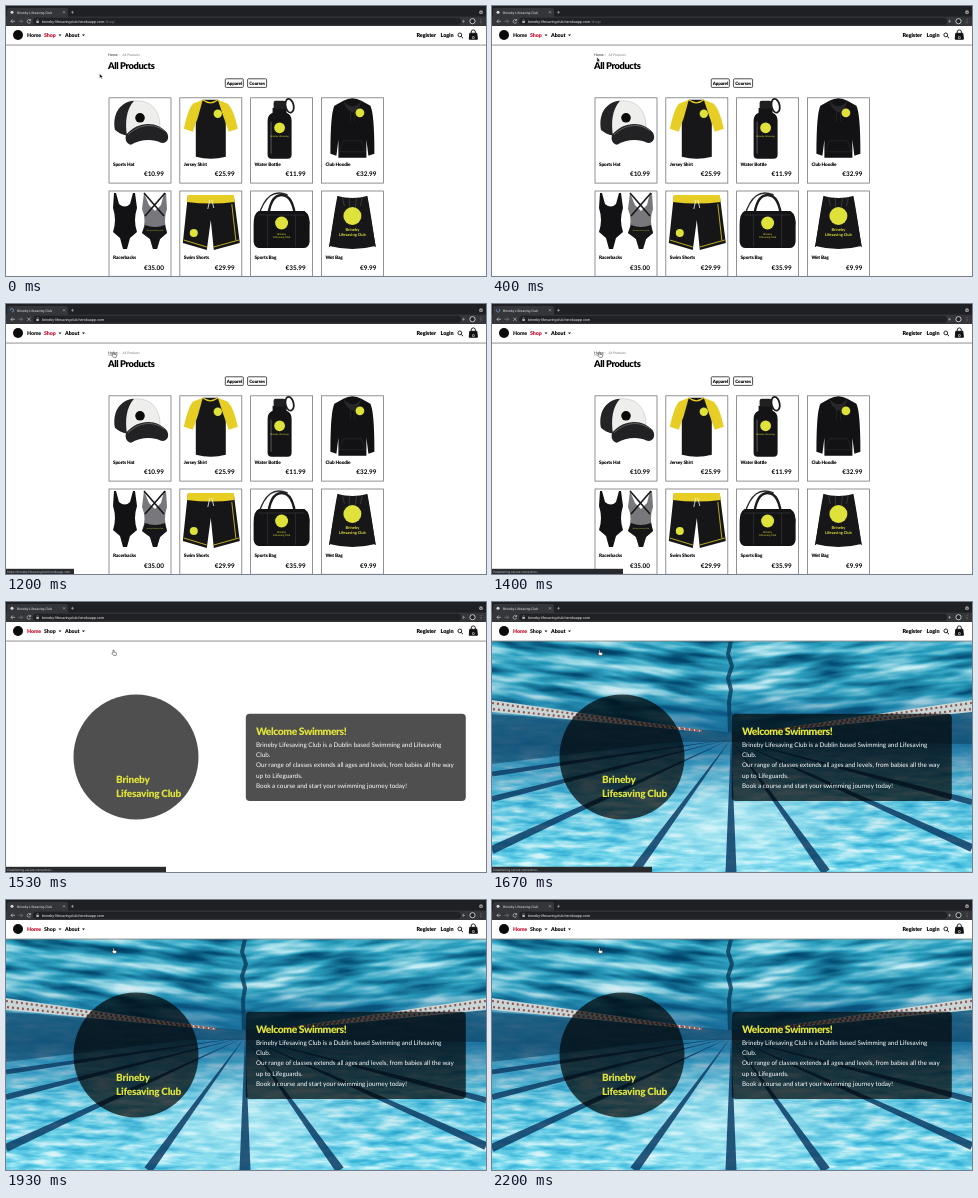
Animation, 480 px wide and 270 px high, one loop 2540 ms. Source, as an HTML page:

```html
<!DOCTYPE html>
<html lang="en">
<head>
<meta charset="utf-8">
<title>Lifesaving club shop</title>
<style>
  html, body { margin: 0; width: 100%; height: 100%; overflow: hidden; background: #fff; }
  svg { display: block; width: 100vw; height: 100vh; }
  text { font-family: Lato, sans-serif; text-rendering: geometricPrecision; white-space: pre; }
  .ui { font-family: Roboto, sans-serif; }
  .head { font-weight: 900; }
</style>
</head>
<body>
<svg id="stage" viewBox="0 0 480 270" xmlns="http://www.w3.org/2000/svg"></svg>
<script>
const LOOP = 2540;
const YELLOW = '#dfe23a', BLACK = '#0b0b0b', RED = '#c8102e';
const HOST = 'brineby-lifesavingclub.herokuapp.com';
const stage = document.getElementById('stage');

const text = (x, y, size, str, attrs = '') =>
  `<text x="${x}" y="${y}" font-size="${size}" ${attrs}>${str}</text>`;
const head = (x, y, size, str, attrs = '') =>
  text(x, y, size, str, `class="head" letter-spacing="${-size * 0.022}" ${attrs}`);
const rect = (x, y, w, h, fill, attrs = '') =>
  `<rect x="${x}" y="${y}" width="${w}" height="${h}" fill="${fill}" ${attrs}/>`;
const path = (d, fill, attrs = '') => `<path d="${d}" fill="${fill}" ${attrs}/>`;
const line = (d, color, width, attrs = '') =>
  path(d, 'none', `stroke="${color}" stroke-width="${width}" ${attrs}`);
const dot = (x, y, r, fill = YELLOW) => `<circle cx="${x}" cy="${y}" r="${r}" fill="${fill}"/>`;

function browser() {
  return rect(0, 0, 480, 20, '#1f2023')
    + path('M1 11V4Q1 2 3 2H60Q62 2 62 4V11Z', '#35363a')
    + rect(0, 10.6, 480, 9.4, '#35363a')
    + rect(27, 11.8, 428, 7, '#202124', 'rx="3.5"')
    + `<g id="favicon">${dot(6, 6.3, 1.5, '#d8d8d8')}</g>`
    + line('M4.3 6.3A1.7 1.7 0 1 1 6 8', '#8ab4f8', 0.6, 'id="spinner"')
    + text(11, 7.6, 3.4, 'Brineby Lifesaving Club', 'class="ui" fill="#e2e2e4"')
    + line('M57 5.3L59 7.3M59 5.3L57 7.3M65 6.3H68M66.5 4.8V7.8', '#c8c9cb', 0.5)
    + dot(475, 6.2, 1.9, '#9a9b9e') + line('M474 5.8L475 6.8L476 5.8', '#1f2023', 0.6)
    + line('M9 15.3H5M6.7 13.5L4.9 15.3L6.7 17.1', '#e0e0e0', 0.6)
    + line('M12.5 15.3H16.5M14.8 13.5L16.6 15.3L14.8 17.1', '#85868a', 0.6)
    + line('M24.2 14.2A1.8 1.8 0 1 0 24.6 15.8M24.6 13V14.6H23', '#d5d5d5', 0.6, 'id="reload"')
    + line('M21.3 13.7L24.5 16.9M24.5 13.7L21.3 16.9', '#d5d5d5', 0.6, 'id="stop"')
    + rect(30.4, 15, 2.4, 2, '#b9babd')
    + line('M30.9 15V14.2A0.7 0.7 0 0 1 32.3 14.2V15', '#b9babd', 0.4)
    + `<text class="ui" x="36" y="16.6" font-size="3.7" fill="#ededee">${HOST}<tspan id="route" fill="#85868a">/shop/</tspan></text>`
    + line('M457.5 13.8V16.8M456 15.3H459', '#b9babd', 0.5)
    + `<circle cx="466.5" cy="15.2" r="2.6" fill="#202124" stroke="#e6e9ea" stroke-width="0.8"/>`
    + [13.6, 15.2, 16.8].map(y => dot(475, y, 0.4, '#d5d5d5')).join('');
}

function navbar() {
  const caret = x => path(`M${x} 28.5h3l-1.5 1.7z`, '#111');
  return rect(0, 20, 480, 19, '#fff')
    + rect(0, 38.6, 480, 0.9, '#858585')
    + dot(12, 29, 5, BLACK)
    + head(21, 31.4, 5.3, 'Home', 'id="navHome"')
    + head(38, 31.4, 5.3, 'Shop', 'id="navShop"') + caret(52.5)
    + head(59, 31.4, 5.3, 'About') + caret(76)
    + head(410.5, 31.4, 5.5, 'Register') + head(434.5, 31.4, 5.5, 'Login')
    + line('M455.2 30.4L457 32.2', '#111', 1)
    + '<circle cx="453.8" cy="28.9" r="1.9" fill="none" stroke="#111" stroke-width="0.9"/>'
    + path('M463.8 27.3H470.8L471.4 33.2H463.2Z', '#111', 'stroke="#111" stroke-linejoin="round"')
    + line('M465.2 27V26A2.1 2.1 0 0 1 469.4 26V27', '#111', 0.9)
    + text(467.3, 32.7, 4, '0', 'fill="#fff" text-anchor="middle" font-weight="700"');
}

// Product pictures, drawn in a 62 x 62 box.
const pictures = {
  hat: path('M6 32C4 14 14 3 28 3C43 3 51 14 51 29L27 39Z', '#eeeeec', 'stroke="#b9b9b9" stroke-width="0.5"')
    + path('M6 32C3 15 12 4 25 3C17 12 16 25 18 38C13 37 9 35 6 32Z', '#242426')
    + path('M18 36C28 24 48 22 58 35C61 41 58 46 52 45C43 40 30 42 22 47C17 46 15 40 18 36Z', '#222224')
    + line('M19 37C30 26 45 25 55 33', '#8a8a8a', 0.6)
    + dot(31, 20, 4.8, BLACK),
  jersey: path('M23 2H38L46 10V59Q31 63 16 59V10Z', '#171719')
    + path('M23 2L13 6Q8 12 4 31L13 34L18 20Z', '#e7ce24')
    + path('M38 2L48 6Q54 12 58 31L49 34L44 20Z', '#e7ce24')
    + line('M23 2Q30.5 8 38 2', '#e7ce24', 1.2)
    + dot(38, 16, 4.2),
  bottle: path('M22 10H36V15Q41 17 41 23V57Q41 61 37 61H21Q17 61 17 57V23Q17 17 22 15Z', '#141416')
    + rect(23, 3, 12, 8, '#202022', 'rx="2"')
    + '<ellipse cx="39" cy="8" rx="4" ry="7" fill="none" stroke="#1b1b1d" stroke-width="1.8" transform="rotate(-12 39 8)"/>'
    + line('M20.5 24V56', '#4b4b50', 1.2)
    + dot(29, 30, 5.4)
    + text(29, 39.5, 2.3, 'Brineby Lifesaving', `fill="${YELLOW}" text-anchor="middle"`),
  hoodie: path('M22 3Q31 -2 40 3L49 8Q53 16 53 56L47 58L45 42V60H17V42L15 58L9 56Q9 16 13 8Z', '#121214')
    + path('M22 3Q31 14 40 3Q38 12 31 15Q24 12 22 3Z', '#28282b')
    + line('M22 43H40L44 54H18ZM29 14V24M33 14V24', '#2d2d31', 0.6)
    + dot(38.5, 15, 4.4),
  racer: path('M7 2L10 13Q16 18 21 13L24 2H26L28 17Q24 29 28 41L21 47L18 58H14L11 47L4 41Q8 29 4 17L5 2Z', '#121214')
    + path('M35 2L40 14L46 20L52 14L55 2H57L58 18Q54 29 58 42L51 48L48 58H44L41 48L33 42Q38 29 33 18Z', '#77777c')
    + line('M35 2L55 25M56 2L36 25M34 41L57 41', '#161618', 1.6)
    + path('M33 42Q35 37 36 34Q46 38 56 34L58 42L51 48L48 58H44L41 48Z', '#161618')
    + text(46, 39.5, 1.6, 'Brineby Lifesaving Club', `fill="${YELLOW}" text-anchor="middle"`),
  shorts: path('M8 5H54L60 52L34 59L31 29L27 59L3 52Z', '#161618')
    + path('M8 4H54L55 11Q31 14 7 11Z', '#e7ce24')
    + line('M4 49L27 56M59 49L34 56M52 13L56 49', '#e7ce24', 0.8)
    + line('M30 9L28 18M32 9L34 17', '#f5f5f5', 0.8)
    + dot(14, 42, 4),
  bag: line('M17 30Q19 4 31 4Q43 4 45 30', '#1b1b1d', 2.4)
    + line('M8 25Q17 -5 37 4', '#29292c', 1.4)
    + path('M8 20H54Q60 24 59 36V51Q58 57 53 57H9Q4 57 3 51V34Q3 22 8 20Z', '#131315')
    + line('M8 24H54M17 24V56M45 24V56', '#313136', 0.8)
    + dot(31, 32, 6.5)
    + text(31, 44, 2.6, 'Brineby', `fill="${YELLOW}" text-anchor="middle"`)
    + text(31, 47, 2.6, 'Lifesaving Club', `fill="${YELLOW}" text-anchor="middle"`),
  wet: line('M17 5L8 56M45 5L54 56', '#222', 1)
    + path('M16 5Q31 9 46 5Q49 20 54 55Q31 61 8 55Q13 20 16 5Z', '#171719')
    + line('M21 6L23 15M28 7V16M35 7L34 16M41 6L39 15', '#45454a', 0.7)
    + dot(31, 25, 9)
    + text(31, 40, 4, 'Brineby', `fill="${YELLOW}" text-anchor="middle" font-weight="700"`)
    + text(31, 45, 4, 'Lifesaving Club', `fill="${YELLOW}" text-anchor="middle" font-weight="700"`)
};

const products = [
  ['hat', 'Sports Hat', '10.99'], ['jersey', 'Jersey Shirt', '25.99'],
  ['bottle', 'Water Bottle', '11.99'], ['hoodie', 'Club Hoodie', '32.99'],
  ['racer', 'Racerbacks', '35.00'], ['shorts', 'Swim Shorts', '29.99'],
  ['bag', 'Sports Bag', '35.99'], ['wet', 'Wet Bag', '9.99']
];

function card([picture, name, price], i) {
  const x = 103 + (i % 4) * 70.8, y = i < 4 ? 91.8 : 185;
  return `<g transform="translate(${x} ${y})">`
    + rect(0, 0, 62, 85.3, '#fff', 'stroke="#77777a" stroke-width="0.8"')
    + pictures[picture]
    + head(4, 68, 4.7, name)
    + text(55, 78.6, 6.4, '€' + price, 'text-anchor="end" font-weight="700"') + '</g>';
}

function shopPage() {
  const button = (x, w, label) =>
    rect(x, 72.8, w, 8.6, '#fff', 'rx="0.8" stroke="#222" stroke-width="0.8"')
    + head(x + w / 2, 78.8, 4.5, label, 'text-anchor="middle"');
  return text(102, 49.8, 3.6, 'Home', 'id="crumb" fill="#222"')
    + text(112.5, 49.8, 3.6, '›', 'fill="#777"')
    + text(116.5, 49.8, 3.3, 'All Products', 'fill="#777"')
    + text(102, 63.4, 9.3, 'All Products', 'class="head" letter-spacing="-0.4"')
    + button(219.3, 18, 'Apparel') + button(241.6, 19, 'Courses')
    + products.map(card).join('');
}

// Noise mapped to a colour ramp, one list of levels per channel.
function waterFilter(id, freq, seed, r, g, b) {
  return `<filter id="${id}" x="0" y="0" width="1" height="1" color-interpolation-filters="sRGB">
    <feTurbulence type="fractalNoise" baseFrequency="${freq}" numOctaves="3" seed="${seed}"/>
    <feColorMatrix values="1 0 0 0 0 1 0 0 0 0 1 0 0 0 0 0 0 0 0 1"/>
    <feComponentTransfer><feFuncR type="table" tableValues="${r}"/>
    <feFuncG type="table" tableValues="${g}"/><feFuncB type="table" tableValues="${b}"/>
    </feComponentTransfer></filter>`;
}

function pool() {
  const depth = [[0, 0], [22, 0.1], [36, 0.7], [45, 0.8], [54, 0.5], [70, 0.12], [100, 0]];
  const navy = '#0d3d66';
  const lane = (x, y, w) => {
    const dx = x - 239, dy = y - 137, n = Math.hypot(dx, dy);
    const ox = dy / n * w, oy = dx / n * w;
    return path(`M239 137L${x - ox} ${y + oy}L${x + ox} ${y - oy}Z`, navy, 'opacity="0.85"');
  };
  const surface = (x, skew) => `<g transform="translate(238 0) skewY(${skew})">`
    + rect(x, 30, 250, 125, '#fff', 'filter="url(#waves)"') + '</g>';
  const rope = (x0, y0, x1, y1) =>
    path(`M${x0} ${y0 - 6}L${x1} ${y1 - 0.8}V${y1 + 0.8}L${x0} ${y0 + 6}Z`, '#c9d6d6')
    + line(`M${x0} ${y0 - 3}L${x1} ${y1}L${x0} ${y0 + 3}`, '#8f5350', 2.2, 'stroke-dasharray="2 3"');
  return '<defs>'
    + waterFilter('waves', '0.014 0.085', 7, '0 .01 .18 .8 1', '.2 .3 .64 .96 1', '.32 .45 .76 .98 1')
    + waterFilter('floor', '0.035 0.17', 3, '.1 .24 .46 .8 1', '.6 .72 .85 .96 1', '.78 .86 .93 .98 1')
    + '<linearGradient id="depth" x2="0" y2="1">'
    + depth.map(([o, a]) => `<stop offset="${o}%" stop-color="#125f90" stop-opacity="${a}"/>`).join('')
    + '</linearGradient><radialGradient id="glow"><stop stop-color="#d9fafd" stop-opacity="0.6"/>'
    + '<stop offset="1" stop-color="#d9fafd" stop-opacity="0"/></radialGradient>'
    + `<clipPath id="above">${path('M0 39H480V110L239 131L0 110Z', '#fff')}</clipPath></defs>`
    + rect(0, 105, 480, 165, '#fff', 'filter="url(#floor)"')
    + `<g clip-path="url(#above)">${surface(-250, 6)}${surface(0, -6)}</g>`
    + rect(0, 39, 480, 231, 'url(#depth)')
    + path('M0 112L239 130L480 110V142L300 140H180L0 162Z', '#0c3858', 'opacity="0.5"')
    + '<ellipse cx="239" cy="225" rx="130" ry="70" fill="url(#glow)"/>'
    + lane(0, 172, 2.5) + lane(0, 197, 3) + lane(0, 248, 4) + lane(142, 270, 4.5)
    + lane(239, 270, 5.5) + lane(334, 270, 4.5) + lane(480, 246, 4) + lane(480, 200, 3)
    + line('M239 39L236 52L240 64L236 76L239 88L237 100L238 130', '#0b3a5a', 4, 'opacity="0.8"')
    + rope(0, 104, 210, 129) + rope(480, 104, 275, 129);
}

function homePage() {
  const shade = 'rgba(0,0,0,0.69)';
  const lines = ['Brineby Lifesaving Club is a Dublin based Swimming and Lifesaving', 'Club.',
    'Our range of classes extends all ages and levels, from babies all the way',
    'up to Lifeguards.', 'Book a course and start your swimming journey today!'];
  return `<g id="pool">${pool()}</g>`
    + dot(130, 155, 62.5, shade)
    + head(110, 181.3, 10, 'Brineby', `fill="${YELLOW}"`)
    + head(110, 194.6, 10, 'Lifesaving Club', `fill="${YELLOW}"`)
    + rect(239.8, 111.7, 220, 87.3, shade, 'rx="4"')
    + text(250, 132.6, 10.3, 'Welcome Swimmers!', `class="head" letter-spacing="-0.42" fill="${YELLOW}"`)
    + lines.map((s, i) => text(250, 145.2 + i * 10.1, 6.35, s, 'fill="#fff"')).join('');
}

function pointers() {
  const join = 'stroke-width="0.5" stroke-linejoin="round"';
  return '<g id="pointer">'
    + path('M0 0V4.8L1.2 3.8L2 5.5L2.9 5.1L2.1 3.5H3.5Z', '#111', `id="arrow" stroke="#fff" ${join}`)
    + path('M0 0Q0.5 -0.6 1 0V2L3.2 2.5Q3.8 2.7 3.6 3.5L3.1 5.2H0.5L-1.1 3.2Q-1 2.5 0 2.9Z',
      '#fff', `id="hand" stroke="#222" ${join}`)
    + '</g>';
}

stage.innerHTML = rect(0, 0, 480, 270, '#fff')
  + `<g id="shop">${shopPage()}</g><g id="home">${homePage()}</g>`
  + navbar() + browser()
  + '<g id="status">' + rect(0, 264.8, 68, 5.2, '#292a2d', 'id="statusBox"')
  + text(1.2, 268.5, 3.15, '', 'id="statusText" class="ui" fill="#bfc0c3"') + '</g>'
  + pointers();

const el = {};
stage.querySelectorAll('[id]').forEach(node => el[node.id] = node);
const show = (id, on) => el[id].setAttribute('display', on ? 'inline' : 'none');
const clamp = v => Math.max(0, Math.min(1, v));

function statusAlpha(t) {
  if (t < 665) return 0;
  if (t < 727) return 0.5;
  return 1 - clamp((t - 1725) / 130);
}

function render(t) {
  const home = t >= 1530, hover = t >= 525, loading = t >= 1200 && !home;
  show('shop', !home);
  show('home', home);
  show('pool', t >= 1670);
  show('route', t < 1200);
  show('spinner', loading);
  show('favicon', !loading);
  show('stop', loading);
  show('reload', !loading);
  el.spinner.setAttribute('transform', `rotate(${t * 0.6} 6 6.3)`);
  el.navHome.setAttribute('fill', home ? RED : '#111');
  el.navShop.setAttribute('fill', home ? '#111' : RED);
  el.crumb.setAttribute('text-decoration', hover ? 'underline' : 'none');

  const connecting = t >= 1270;
  el.status.setAttribute('opacity', statusAlpha(t));
  el.statusBox.setAttribute('width', home ? 160 : connecting ? 131 : 68);
  el.statusText.textContent = connecting ? 'Establishing secure connection...' : 'https://' + HOST;

  // The pointer advances in eight eased steps.
  const k = clamp(Math.floor((t + 8) / 66.7) / 8);
  const e = k * k * (3 - 2 * k);
  el.pointer.setAttribute('transform', `translate(${93.5 + 13.5 * e} ${67.5 - 19.3 * e})`);
  show('arrow', !hover);
  show('hand', hover);
}

const start = performance.now();
function tick() {
  render((performance.now() - start) % LOOP);
  requestAnimationFrame(tick);
}
render(0);
requestAnimationFrame(tick);
</script>
</body>
</html>
```
